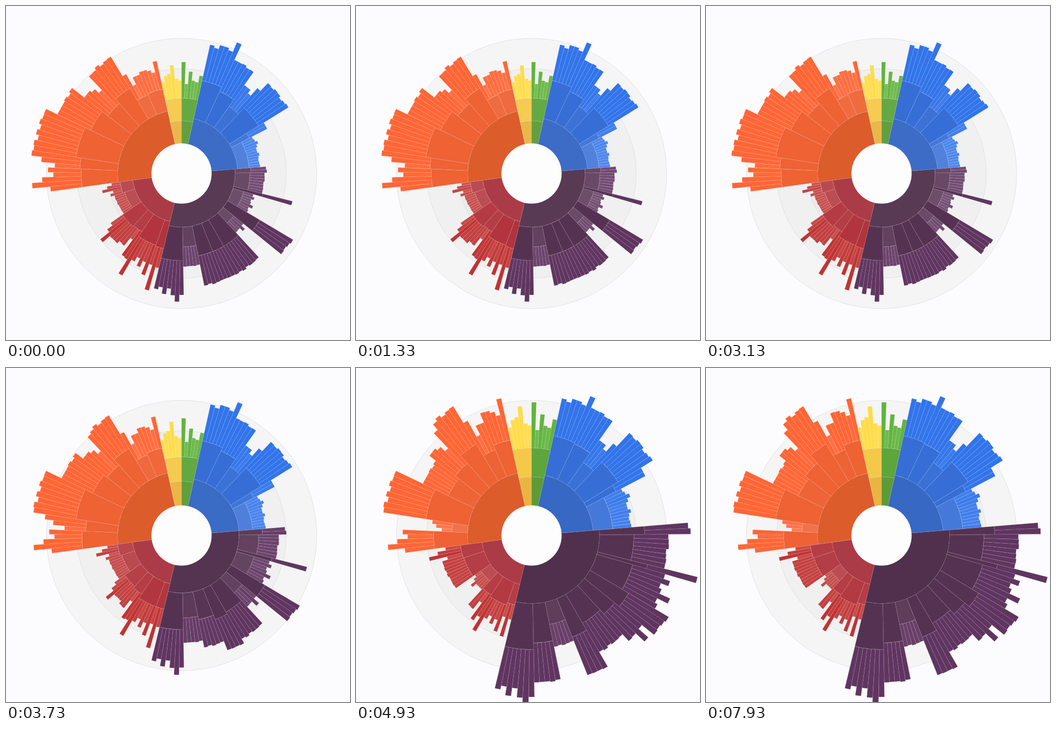
Recreate the animation shown at these times as an HTML page. Size 680 by 660 pixels, loop 8000 ms.

```html
<!DOCTYPE html>
<html lang="en">
<head>
<meta charset="utf-8">
<title>Radial chart</title>
<style>
  html, body { margin: 0; width: 100%; height: 100%; overflow: hidden; background: #fcfcfe; }
  svg { display: block; width: 680px; height: 660px; }
</style>
</head>
<body>
<svg id="stage" viewBox="0 0 680 660"></svg>
<script>
const CX = 347, CY = 331, HOLE = 59;
const LOOP = 8000, TICK = 200 / 3, START = 3410, DURATION = 800;
const EVEN = 0.08;

// Branches are [leaves, mean before, mean after, tallest leaf]; without a tallest leaf they are even.
// Colours run from the inner ring to the leaves.
const groups = [
  { colors: ['#5a9a34', '#5ca43a', '#62b43e'], spread: 0.6, branches: [[6, 45, 57, 0]] },
  { colors: ['#3668c4', '#366ed6', '#3274ea'], spread: 0.25, branches: [
    [6, 77, 80, 5], [5, 68, 78], [4, 52, 55, 3], [7, 68, 79], [2, 40, 66], [11, 23, 39, 2]] },
  { colors: ['#50304c', '#563252', '#603560'], spread: 0.25, branches: [
    [2, 31, 89], [7, 29, 68], [1, 60, 102], [7, 22, 74, 4], [4, 74, 89], [4, 27, 77, 1],
    [6, 60, 66], [4, 60, 82], [5, 60, 45], [5, 39, 78], [7, 66, 91, 1]] },
  { colors: ['#a42c38', '#b03038', '#c03434'], spread: 0.6, branches: [
    [3, 55, 42, 1], [7, 53, 47, 5], [4, 42, 43, 0], [6, 45, 23, 3], [8, 21, 42], [5, 25, 43, 2]] },
  { colors: ['#dc5c2c', '#ee6234', '#ff6636'], spread: 0.4, branches: [
    [5, 72, 67, 1], [3, 75, 31, 2], [8, 85, 85], [6, 73, 56],
    [5, 59, 65, 4], [5, 71, 85], [4, 43, 58, 0], [5, 45, 67, 4]] },
  { colors: ['#e8b440', '#f4c848', '#ffdc48'], spread: 0.5, branches: [[6, 45, 57, 3]] }
];

const svg = document.getElementById('stage');
const mix = (a, b, k) => a + (b - a) * k;
const clamp = v => Math.min(1, Math.max(0, v));
const average = list => list.reduce((sum, v) => sum + v, 0) / list.length;
const easeInOut = k => k < 0.5 ? 4 * k ** 3 : 1 - 4 * (1 - k) ** 3;

let seed = 7;
const random = () => (seed = seed * 16807 % 2147483647) / 2147483647;

function add(tag, attrs) {
  const el = document.createElementNS('http://www.w3.org/2000/svg', tag);
  for (const name in attrs) el.setAttribute(name, attrs[name]);
  return svg.appendChild(el);
}

const disc = (r, fill, stroke) => add('circle', { cx: CX, cy: CY, r, fill, stroke });
const wedge = () => add('path', { stroke: '#fff', 'stroke-opacity': 0.22, 'stroke-width': 0.6 });

// Lower values are drawn paler
function shade(hex, value) {
  const pale = 0.18 * clamp((60 - value) / 50);
  const rgb = [1, 3, 5].map(i => Math.round(mix(parseInt(hex.slice(i, i + 2), 16), 255, pale)));
  return `rgb(${rgb})`;
}

function paint(el, from, to, inner, value, color) {
  const outer = inner + value;
  const point = (i, r) => {
    const a = i / total * 2 * Math.PI;
    return `${(CX + r * Math.sin(a)).toFixed(2)} ${(CY - r * Math.cos(a)).toFixed(2)}`;
  };
  el.setAttribute('d', `M${point(from, inner)}L${point(from, outer)}` +
    `A${outer} ${outer} 0 0 1 ${point(to, outer)}L${point(to, inner)}` +
    `A${inner} ${inner} 0 0 0 ${point(from, inner)}Z`);
  el.setAttribute('fill', shade(color, value));
}

// Relative leaf heights that average to one
function profile(count, spread, peak) {
  const bumps = Array.from({ length: count }, (_, i) => i === peak ? 1 : random() - 0.6);
  const mean = average(bumps);
  const scale = peak === undefined ? EVEN : spread;
  return bumps.map(v => 1 + scale * (v - mean));
}

disc(267, '#f5f5f5', '#e2e2e5');
disc(207, '#f0f0f0', '#e0e0e2');
disc(147, '#ebebeb', '#dedee0');

let total = 0;
const chart = groups.map(({ colors, spread, branches }) => {
  const start = total;
  const parts = branches.map(([count, before, after, peak]) => {
    const leaves = profile(count, spread, peak).map(height => ({ el: wedge(), height }));
    const part = { el: wedge(), leaves, before, after, start: total };
    total += count;
    return part;
  });
  return { el: wedge(), colors, parts, start, end: total };
});

disc(59.5, '#fdfdfe', 'none');

// Every ring is as thick as the mean of the leaves beyond it
function drawGroup({ el, colors, parts, start, end }, k) {
  const values = parts.map(p => mix(p.before, p.after, k));
  const mean = average(parts.flatMap((p, i) => p.leaves.map(() => values[i])));
  const base = HOLE + mean;
  paint(el, start, end, HOLE, mean, colors[0]);
  parts.forEach((p, i) => {
    const value = values[i];
    paint(p.el, p.start, p.start + p.leaves.length, base, value, colors[1]);
    p.leaves.forEach((leaf, j) =>
      paint(leaf.el, p.start + j, p.start + j + 1, base + value, value * leaf.height, colors[2]));
  });
}

let shown = -1;

function draw(time) {
  const stepped = Math.floor((time % LOOP + 4) / TICK) * TICK;
  const k = easeInOut(clamp((stepped - START) / DURATION));
  if (k === shown) return;
  shown = k;
  chart.forEach(group => drawGroup(group, k));
}

const startTime = performance.now();

function loop() {
  draw(performance.now() - startTime);
  requestAnimationFrame(loop);
}

loop();
</script>
</body>
</html>
```
